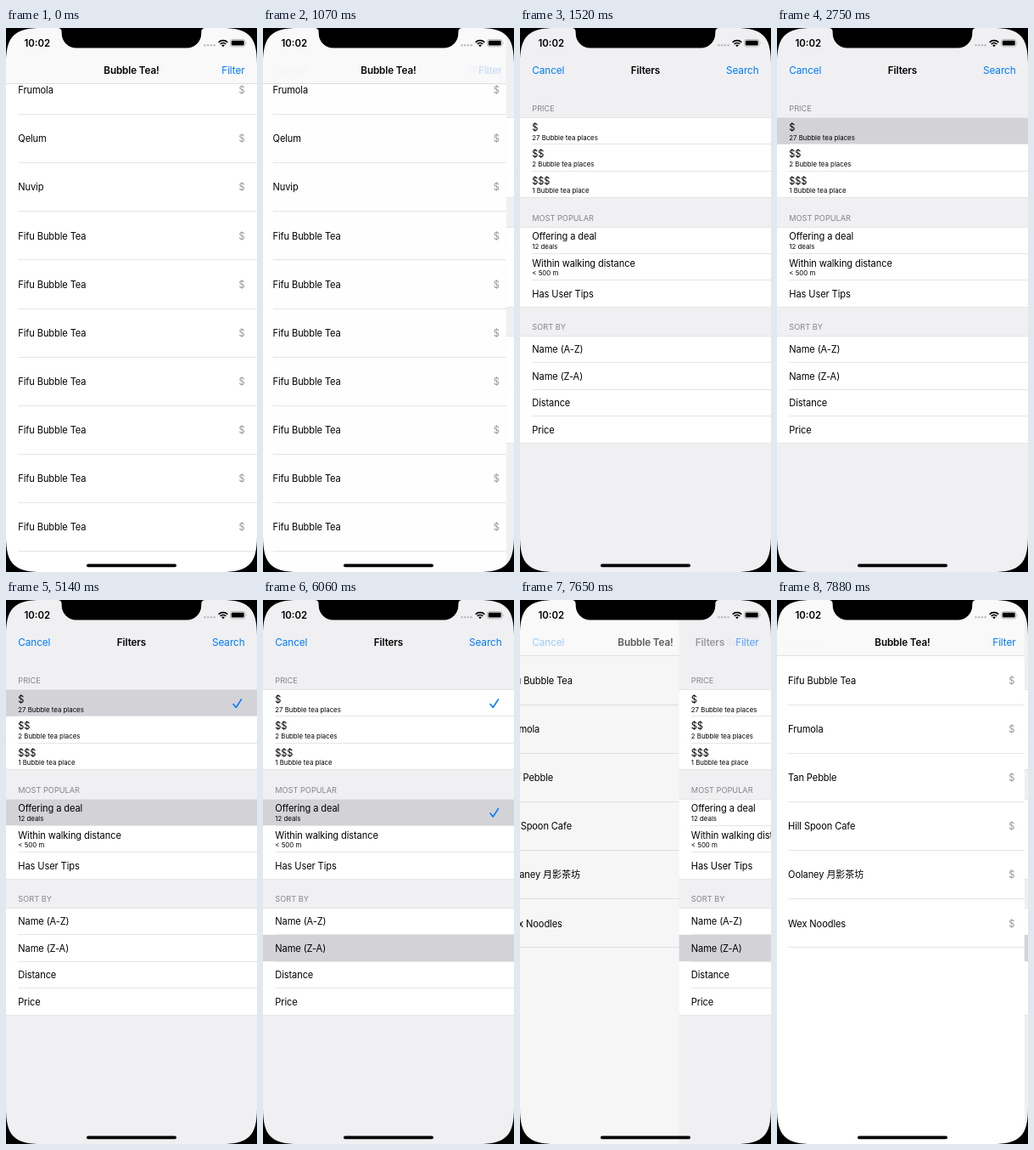
Write an HTML page that moves like this. It is 296 by 640 pixels and loops after 7.99 s.

```html
<!DOCTYPE html>
<html lang="en">
<head>
<meta charset="utf-8">
<title>Bubble Tea filters</title>
<style>
html, body { margin: 0; height: 100%; overflow: hidden; background: #000; }
svg { display: block; width: 100vw; height: 100vh; }
text {
  font: 11.1px Inter, "Noto Sans CJK SC", "Noto Sans CJK JP", "Noto Sans CJK", sans-serif;
  letter-spacing: -.01em; white-space: pre;
}
.bar { font-size: 11.8px; fill: #007aff; }
.title { font-size: 11.7px; font-weight: 600; text-anchor: middle; }
.head { font-size: 9.2px; letter-spacing: 0; fill: #85858b; }
.detail { font-size: 7.85px; letter-spacing: 0; }
.clock { font-size: 11.4px; font-weight: 600; letter-spacing: 0; }
.price { fill: #98989c; }
.end { text-anchor: end; }
.check { fill: none; stroke: #007aff; stroke-width: 1.6; stroke-linecap: round; stroke-linejoin: round; }
</style>
</head>
<body>
<svg viewBox="0 0 296 640">
  <rect width="296" height="640" fill="#fff"/>
  <g id="list">
    <g id="all"></g>
    <g id="found"></g>
    <rect id="dim" y="66" width="296" height="574"/>
    <rect width="296" height="66" fill="#f9f9f9"/>
    <rect y="65" width="296" height="1" fill="#dfdfe1"/>
  </g>
  <g id="filters"></g>
  <g id="listBar">
    <text class="title" x="148" y="54.2">Bubble Tea!</text>
    <text class="bar end" id="filterBtn" x="281.5" y="54.2">Filter</text>
  </g>
  <g id="filterBar">
    <text class="bar" x="14.3" y="54.2">Cancel</text>
    <text class="title" id="filterTitle" x="148" y="54.2">Filters</text>
    <text class="bar end" id="searchBtn" x="281.5" y="54.2">Search</text>
  </g>
  <!-- status bar -->
  <text class="clock" x="21.5" y="22.2">10:02</text>
  <g fill="#bdbdc0">
    <circle cx="234.5" cy="20.3" r="1.2"/><circle cx="238.2" cy="20.3" r="1.2"/>
    <circle cx="241.9" cy="20.3" r="1.2"/><circle cx="245.6" cy="20.3" r="1.2"/>
  </g>
  <path d="M250.7 16.9a7.5 7.5 0 0 1 10.6 0M252.7 19a4.7 4.7 0 0 1 6.6 0" fill="none" stroke="#000" stroke-width="1.7"/>
  <path d="M256 22.3l-1.8-1.9a2.6 2.6 0 0 1 3.6 0z"/>
  <rect x="264.5" y="13.5" width="17.5" height="8.4" rx="2.4" fill="none" stroke="#aaa" stroke-width=".8"/>
  <rect x="265.8" y="14.8" width="14.9" height="5.8" rx="1.3"/>
  <path d="M283 16.2q1.3 1.5 0 3z" fill="#aaa"/>
  <!-- device edges -->
  <path fill-rule="evenodd" d="M-1-1h298v642h-298z
    M0 42C0 9.7 9.7 0 42 0H254c32.3 0 42 9.7 42 42V598c0 32.3-9.7 42-42 42H42c-32.3 0-42-9.7-42-42z"/>
  <path d="M61 0q4.7 0 4.7 5v1.5a17 17 0 0 0 17 17h130.6a17 17 0 0 0 17-17v-1.5q0-5 4.7-5z"/>
  <rect x="95" y="630.6" width="106" height="3.6" rx="1.8"/>
</svg>
<script>
const LOOP = 7990, PUSH = 1070, POP = 7530, ROW = 31.43, CELL = 57.14;
const $ = id => document.getElementById(id);
const text = (x, y, s, cls = "") => `<text class="${cls}" x="${x}" y="${y}">${s}</text>`;
const line = (x, y) => `<rect x="${x}" y="${Math.round(y - .5)}" width="${296 - x}" height="1" fill="#e5e5e7"/>`;

const places = (names, top) => names.map((name, i) => {
  const y = top + i * CELL;
  return text(14.3, y + 32.8, name) + text(281.5, y + 32.8, "$", "price end") + line(14.5, y + CELL);
}).join("");

$("all").innerHTML = places(["Frumola", "Qelum", "Nuvip", ...Array(7).fill("Fifu Bubble Tea")], 44.3);
$("found").innerHTML = places(["Fifu Bubble Tea", "Frumola", "Tan Pebble", "Hill Spoon Cafe",
  "Oolaney 月影茶坊", "Wex Noodles"], 66);

const groups = [
  [105.5, "PRICE", ["$", "27 Bubble tea places"], ["$$", "2 Bubble tea places"], ["$$$", "1 Bubble tea place"]],
  [234, "MOST POPULAR", ["Offering a deal", "12 deals"], ["Within walking distance", "&lt; 500 m"], ["Has User Tips"]],
  [362.5, "SORT BY", ["Name (A-Z)"], ["Name (Z-A)"], ["Distance"], ["Price"]]
];

// row title: [highlight from, highlight to, check from]
const taps = {
  "$": [2750, 6060, 5140],
  "Offering a deal": [5140, 7290, 6060],
  "Name (Z-A)": [6060, LOOP, 7290]
};
const picked = [];

let page = `<rect width="296" height="640" fill="#f0f0f3"/>`;
for (const [top, head, ...rows] of groups) {
  page += text(14.3, top - 7.1, head, "head");
  rows.forEach(([name, detail], i) => {
    const y = top + i * ROW, tap = taps[name];
    page += `<rect y="${y}" width="296" height="${ROW + .1}" fill="#fff"/>`;
    if (tap) {
      const n = picked.push(tap) - 1;
      page += `<rect id="mark${n}" y="${y}" width="296" height="${ROW}" fill="#d3d3d7"/>
        <path id="check${n}" class="check" d="M268 ${y + 17}l3.3 4 6.2-9.6"/>`;
    }
    page += text(14.3, y + (detail ? 15.3 : 19.9), name);
    if (detail) page += text(14.3, y + 26, detail, "detail");
    page += line(i ? 14.5 : 0, y);
  });
  page += line(0, top + rows.length * ROW);
}
$("filters").innerHTML = page;

// Remaining distance of a critically damped slide, seen at a low frame rate
function slide(dt, steps) {
  if (dt >= 450) return 0;
  const a = .01708 * (steps.findLast(s => s <= dt) + 16);
  return (1 + a) * Math.exp(-a);
}

const show = (id, on) => $(id).setAttribute("visibility", on ? "visible" : "hidden");
const fade = (id, v) => $(id).setAttribute("opacity", v);
const shift = (id, x) => $(id).setAttribute("transform", `translate(${x} 0)`);

function draw(now) {
  const t = now % LOOP;
  // 1: list on screen, 0: filters on screen
  const x = t < PUSH ? 1
    : t < POP ? slide(t - PUSH, [0, 110, 220, 330])
    : 1 - slide(t - POP, [0, 110, 230, 350]);

  shift("list", -88.8 * (1 - x));
  shift("filters", 296 * x);
  shift("filterTitle", 120 * x);
  fade("dim", .1 * (1 - x));
  fade("listBar", x);
  fade("filterBar", 1 - x);
  fade("filterBtn", t >= 910 && t < POP ? .2 : 1);
  fade("searchBtn", t >= 7290 ? .2 : 1);
  show("all", t < POP);
  show("found", t >= POP);
  picked.forEach(([from, to, check], n) => {
    show("mark" + n, t >= from && t < to);
    show("check" + n, t >= check);
  });
  requestAnimationFrame(() => draw(performance.now() - start));
}
const start = performance.now();
draw(0);
</script>
</body>
</html>
```
